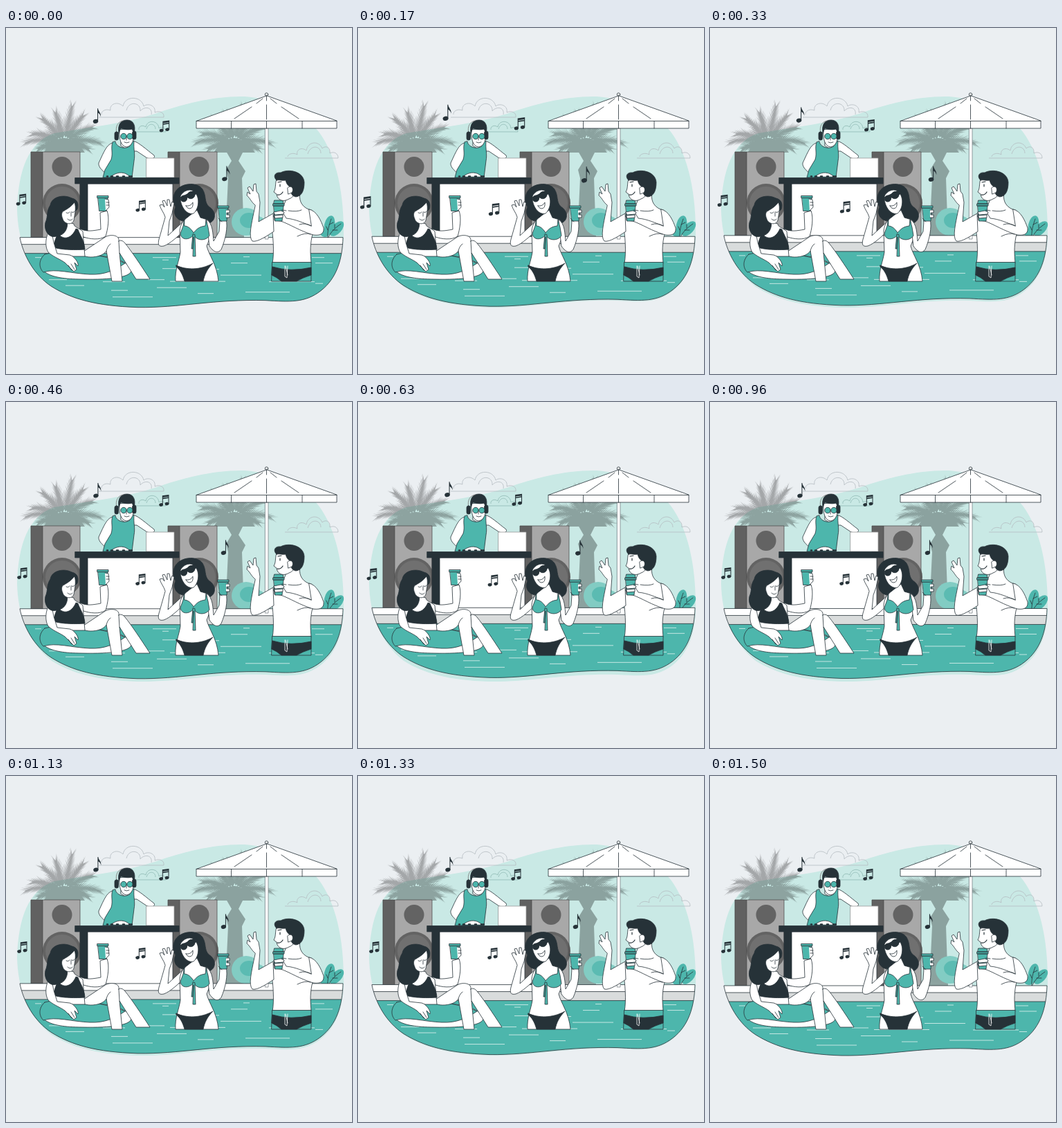
Animation of 500x500 px, one loop 1540 ms. Source, as an HTML page:

```html
<!DOCTYPE html>
<html lang="en">
<head>
<meta charset="utf-8">
<title>Pool party</title>
<style>
  html, body { margin: 0; width: 100%; height: 100%; overflow: hidden; background: #ebeff2; }
  svg { display: block; width: 100vw; height: 100vh; }
  .ink { fill: #fff; stroke: #263238; stroke-width: .8; stroke-linecap: round; stroke-linejoin: round; }
  .d { fill: #263238; }
  .t { fill: #4db6ac; }
  .n { fill: none; }
  .cloud { fill: none; stroke: #b4bcc0; stroke-width: .8; }
  .palm { fill: #000; opacity: .3; }
</style>
</head>
<body>
<svg viewBox="0 0 500 500">
  <defs>
    <g id="single" class="d">
      <ellipse cx="3.400" cy="18.500" rx="3.700" ry="2.900" transform="rotate(-15 3.400 18.500)"/>
      <path d="M5.900 0h1c0 4 4.500 6 4 12-.8-3-2-4.500-4-5.500V18.500h-1z"/>
    </g>
    <g id="double" class="d">
      <ellipse cx="2.600" cy="14.500" rx="2.900" ry="2.300" transform="rotate(-12 2.600 14.500)"/>
      <ellipse cx="11" cy="13.100" rx="2.900" ry="2.300" transform="rotate(-12 11 13.100)"/>
      <path d="M4.300 1.200 14 0V13.500h-1V5L5.300 6.200V14.500h-1zM5.300 3.800V4.600L13 3.500V2.700z"/>
    </g>
    <g id="speaker">
      <path fill="#616161" d="M0 0h18v126H0z"/>
      <path fill="#a8a8a8" d="M17 0h54v126H17z"/>
      <g fill="#636363"><circle cx="45" cy="21.500" r="14.500"/><circle cx="45" cy="74" r="28"/></g>
      <circle cx="45" cy="74" r="24" fill="#707070"/>
      <path d="M0 0h71v126M17 0v126M0 0v126" fill="none" stroke="#444" stroke-width=".7"/>
    </g>
    <g id="cup">
      <path class="t" d="M1 3h14l-2 19H3z"/><path class="t" d="M0 0h16v3H0z"/>
    </g>
    <clipPath id="poolClip"><use href="#poolShape"/></clipPath>
  </defs>

  <path fill="#c9e9e5" d="M16 262C18 205 32 165 70 152 130 142 175 137 215 124 255 110 300 98 345 99 385 102 425 116 452 150 478 185 489 240 488 303 486 335 478 362 455 380 432 398 410 396 375 394 300 392 250 405 190 404 130 402 95 392 66 374 30 345 17 305 16 262Z"/>

  <g class="cloud">
    <path d="M134 129H228C229 122 222 119 215 122 217 112 205 108 199 113 196 98 172 97 169 113 161 105 149 110 151 119 143 116 137 121 138 125M174 119C177 105 195 107 194 120 201 112 212 115 210 125"/>
    <path d="M403 188H480C480 181 474 178 468 181 469 171 461 170 457 174 452 162 436 164 434 177 426 171 419 177 421 183 414 179 407 183 407 186M436 182C440 168 455 170 455 181"/>
    <path stroke="#8fb9b3" d="M187 150H231C231 144 225 142 221 145 220 133 204 132 202 143 196 139 191 143 192 147M203 146C206 136 216 138 216 146"/>
  </g>
  <g class="palm"><path id="palmA"/></g>
  <g class="palm"><path id="palmB"/><path d="M318 178h25l-7 14 10 15-5 10 3 86h-27l4-86-3-12 8-13z"/></g>

  <ellipse cx="347" cy="280" rx="21" ry="20" fill="#82ccc3"/>
  <ellipse cx="363" cy="287" rx="14" ry="15" fill="#82ccc3"/>
  <ellipse class="t" opacity=".75" cx="351" cy="278" rx="13" ry="11"/>
  <g class="t">
    <ellipse cx="467.500" cy="285" rx="7.500" ry="14" transform="rotate(12 467.500 285)"/>
    <ellipse cx="478" cy="290" rx="13" ry="7" transform="rotate(-48 478 290)"/>
    <ellipse cx="461" cy="296" rx="7" ry="6"/>
    <path class="ink n" d="M465 304C464 294 467 284 470 276M465 304C470 293 477 288 484 283M465 292 463 287M467 284 473 281M475 289V284M472 292 479 292"/>
  </g>

  <use href="#speaker" x="36" y="179"/>
  <use href="#speaker" x="234" y="179"/>

  <!-- DJ and booth -->
  <g class="ink">
    <path d="M155 166C146 167 142 178 134 195 133 201 140 208 152 215H166L151 199 159 180zM184 163C193 166 202 175 214 184 216 188 212 190 204 188L189 178 183 178z"/>
    <path d="M167 160h15v10l-7 6-9-6z"/>
    <path class="t" d="M158 164C159 175 182 178 182 163L185 164C184 175 187 182 185 192L182 216H140L143 205 152 190C155 180 151 174 154 165z"/>
    <path d="M164 147C163 160 166 171 174 172 182 171 186 162 185 146z"/>
    <path class="d" d="M163 152C161 139 166 133 175 133 184 133 188 141 185 152L182 146C176 148 170 146 166 145z"/>
    <path class="n" stroke="#777" d="M160 153C157 141 163 135 169 134"/>
    <rect class="d" x="157" y="150" width="5.500" height="12" rx="2.500"/>
    <rect class="d" x="182.500" y="149" width="5.500" height="12" rx="2.500"/>
    <circle class="t" cx="170" cy="156.500" r="4.200"/><circle class="t" cx="179" cy="156.500" r="4.200"/>
    <path class="n" d="M174 158V162M171 165Q174 167 178 165"/>
    <path d="M151 215C160 208 168 208 174 211L180 215z"/>
    <path d="M203 188h40v28h-40z" stroke="#999"/>
    <path d="M117 225h124v80H117z"/>
    <path class="d" d="M100 216.500h150V225H118v79h-11V225h-7z"/>
    <path class="n" stroke-width="2.500" d="M146 214.500h1M152 214.500h2M160 214.500h2M169 214.500h2M178 214.500h4"/>
  </g>

  <!-- Pool -->
  <g id="pool">
    <g clip-path="url(#poolClip)">
      <path fill="#fff" d="M10 303h480v12H10z"/>
      <path fill="#d9dcdc" d="M10 313h480v14H10z"/>
      <path fill="#4db6ac" d="M10 326h480v84H10z"/>
      <path class="ink n" d="M10 313h480M10 326h480" stroke-width=".7"/>
      <path class="n" stroke="#c4e7e3" d="M42 332h9M212 332h34M226 335.500h9M343 331h9M325 340h24M442 332h18M447 340h25M226 348h20M300 349h8M310 357.500h59M205 364h24M237 366.500h80M380 367h66M447 369.500h11M62 364h26M86 372.500h27M152 379.500h24M154 389h58M218 375.500h43M277 384h23M346 382h64M140 367h32"/>
    </g>
    <path id="poolShape" fill="none" stroke="#263238" stroke-width=".8" d="M20 303H487C486 335 478 362 455 380 432 398 410 396 375 394 300 392 250 405 190 404 130 402 95 392 66 374 40 357 25 328 20 303Z"/>
  </g>

  <!-- Umbrella -->
  <g class="ink">
    <path stroke="#7b8589" d="M374.700 145h4.300v160h-4.300z"/>
    <circle cx="376.500" cy="96" r="2.200"/>
    <path d="M376.500 98 275 134.500V145H478V134.500z"/>
    <path class="n" d="M275 134.500H478M325.500 134.500V145M376.500 134.500V145M428 134.500V145M376.500 98V105M376.500 111V132M371 102 362 109M355 114 330 131M382 102 391 109M398 114 423 131"/>
  </g>

  <!-- Woman on the float -->
  <g class="ink">
    <path d="M52 334C45 350 58 363 110 363 153 364 181 360 181 350 179 337 150 328 105 327 72 321 57 324 52 334z"/>
    <path class="t" d="M56 327C47 335 47 346 54 353 72 347 95 355 121 356 143 357 157 350 172 340 145 327 80 320 56 327z"/>
    <path d="M163 308C165 299 150 297 142 303L109 325C108 333 138 334 145 322L153 366H168L164 325 188 363 208 363C195 343 181 322 172 311 169 307 165 306 163 308z"/>
    <path class="n" d="M145 322C146 318 148 314 151 312M164 325 163 308"/>
    <path d="M107 290C116 295 126 293 137 291L136 267 146 264C150 275 147 291 144 301 135 307 121 305 112 302z"/>
    <use href="#cup" x="132" y="242.500"/>
    <path d="M143 247 148 248 149 259 144 264M145 252h4M145 256h4"/>
    <path d="M66 292C72 287 83 290 85 279L98 283C98 288 106 289 111 294L113 319 114 330H73C60 321 56 302 66 292z"/>
    <path class="d" d="M77 289 78 300C86 307 96 302 101 290L104 291C107 300 113 306 114 320 101 321 81 321 69 317 69 308 74 301 77 289z"/>
    <path d="M65 291C57 297 55 317 62 325 71 332 78 334 85 339L98 352 102 349 99 339 104 344C106 340 98 329 92 328L74 326 69 310z"/>
    <path class="n" d="M90 343 95 350M94 341 99 349"/>
    <path class="d" d="M95 246C85 240 66 243 64 256 58 265 61 272 57 281 54 294 64 306 75 300 84 300 91 289 88 278L103 262C106 253 102 247 95 246z"/>
    <path d="M84 264C90 261 95 257 99 252 102 260 99 270 98 278 95 286 84 283 82 276 79 269 81 265 84 264z"/>
    <path class="n" d="M87 267Q90 269 92 266M95 266Q97 268 99 265M94 266V272M89 276Q93 280 96 276"/>
  </g>

  <!-- Woman with sunglasses -->
  <g class="ink">
    <path class="d" d="M244 238C250 224 276 221 284 233 290 243 286 251 293 258 303 264 305 277 294 282L262 279C247 281 240 268 245 259 241 250 241 244 244 238z"/>
    <path d="M230 273C228 266 224 263 222 256L226 255 229 259 226 250 229 249 233 257 233 248 236 248 238 258 240 251 243 253 240 268 236 279 234 300 258 278 262 288C250 300 237 312 228 315 219 317 219 311 222 302z"/>
    <path d="M263 273 276 263 281 274 291 277C300 288 295 303 290 315 293 328 305 342 307 366H245C244 349 250 337 252 324L251 293C252 284 256 278 263 273z"/>
    <path d="M290 277C299 282 299 298 300 308L308 294 309 279 318 276C321 288 317 306 311 320 306 327 299 323 294 315z"/>
    <use href="#cup" x="306" y="257"/>
    <path d="M318 263h5v4h-4v3h4v4h-5M307 275 312 280"/>
    <path d="M252 243C256 235 266 231 273 237 281 247 278 262 271 268 261 271 251 257 252 243z"/>
    <g class="d">
      <ellipse cx="257" cy="246.500" rx="4.800" ry="4.500" transform="rotate(-28 257 246.500)"/>
      <ellipse cx="267.500" cy="241.500" rx="5.800" ry="5" transform="rotate(-28 267.500 241.500)"/>
      <path d="M252 245 275 233 277 239 263 245z"/>
    </g>
    <path d="M260 257Q267 258 270 252 271 261 265 261 262 261 260 257z"/>
    <path class="t" d="M258 274 256 286 252 297C253 307 265 307 271 299 276 308 289 308 294 300L292 288 289 277 288 286C279 287 275 291 271 296 266 287 260 286 258 286z"/>
    <path class="t" d="M270 298 268 319 270 319 271 302 270 330H274L273 299z"/>
    <path class="d" d="M246 343C261 350 281 350 299 340 291 348 287 356 285 366H258C255 355 251 349 246 345z"/>
  </g>

  <!-- Man -->
  <g class="ink">
    <path d="M391 262C402 259 405 251 405 242L425 237C423 248 426 257 437 262 450 263 449 280 442 302 439 318 440 327 441 340H385C388 324 386 300 383 281z"/>
    <path d="M360 256C354 251 353 246 348 242L349 237 353 240 349 231 352 229 357 236 358 226 361 225 362 236 365 240 367 252 365 280 386 268 387 294C378 300 363 310 356 308 350 302 355 282 358 267z"/>
    <path d="M438 262C449 264 455 278 459 289 460 299 452 300 444 299 426 294 409 283 397 279L388 278 387 266 399 265 405 275C418 276 430 282 441 286z"/>
    <path class="t" d="M388 249h12l1 5H387zM386 254h16v3H386zM387 257h14l-2 22h-10z"/>
    <path d="M387 266 397 264 402 266 401 269 389 270zM388 271 400 270V274L389 275z"/>
    <path class="n" d="M398 263 405 264M408 264Q421 266 427 263M424 284Q433 281 441 286M421 301Q433 295 440 298"/>
    <path d="M392 216C388 224 391 230 387 237L391 240C392 249 401 252 409 247 416 245 421 235 420 224L408 210z"/>
    <path class="d" d="M391 220C385 214 389 208 397 209 408 203 430 207 431 223 431 234 428 243 419 244 414 243 411 240 412 233L410 229C406 227 405 223 404 220 400 221 394 219 391 220z"/>
    <path d="M407 231C412 226 417 232 413 238L408 240z"/>
    <path class="n" d="M396 226V229M393 223 398 222M392 241Q397 242 400 237" stroke-width="1.200"/>
    <path class="t" d="M385 338.500H441V366H384z"/>
    <path class="d" d="M385 345Q411 353 441 346V357Q428 361 420 366H398Q391 360 384 357z"/>
    <path class="n" stroke="#fff" d="M403 344V359L406 361 407 344M404 344 407 357"/>
  </g>

  <g id="notes">
    <use href="#single" x="126.500" y="117"/>
    <use href="#single" x="311" y="199.500"/>
    <use href="#double" x="221.500" y="134"/>
    <use href="#double" x="16.500" y="239"/>
    <use href="#double" x="187.500" y="248"/>
  </g>
</svg>
<script>
  const LOOP = 1540;
  const byId = id => document.getElementById(id);

  let seed = 7;
  const random = () => (seed = seed * 16807 % 2147483647) / 2147483647;

  // Each frond runs from the crown to its tip and carries pointed leaflets on both sides.
  function palm(cx, cy, tips) {
    let d = `M${cx - 30} ${cy + 12}Q${cx} ${cy - 30} ${cx + 30} ${cy + 12}z`;
    for (const [dx, dy] of tips) {
      const bend = -Math.abs(dx) * .4;
      for (let i = 4; i <= 20; i++) {
        const u = i / 20;
        const x = cx + dx * u, y = cy + dy * u + bend * u * (1 - u);
        const dir = Math.atan2(dy + bend * (1 - 2 * u), dx);
        for (const side of [-1, 1]) {
          const a = dir + side * (.8 - .45 * u);
          const len = (18 - 6 * u) * (.75 + random() * .4);
          const wx = side * Math.cos(dir) * 1.7, wy = side * Math.sin(dir) * 1.7;
          d += `M${x - wx} ${y - wy}L${x + wx} ${y + wy}L${x + Math.cos(a) * len} ${y + Math.sin(a) * len}z`;
        }
      }
    }
    return d;
  }
  const fronds = [[-54, -3], [-44, -15], [-30, -36], [-12, -44], [11, -53], [26, -40], [39, -24], [51, -2], [-36, 6], [34, 6]];
  byId('palmA').setAttribute('d', palm(84, 168, fronds));
  byId('palmB').setAttribute('d', palm(330, 168, fronds));

  // [time, extra scale] of the beating notes
  const beat = [[0, .01], [200, .09], [430, 0], [580, 0], [730, .09], [905, 0], [LOOP, 0]];
  function beatAt(t) {
    const i = beat.findIndex(key => key[0] > t);
    const [t0, a] = beat[i - 1], [t1, b] = beat[i];
    return a + (b - a) * (1 - Math.cos(Math.PI * (t - t0) / (t1 - t0))) / 2;
  }

  function draw() {
    const t = performance.now() % LOOP;
    const phase = (t + 40) % LOOP / LOOP;
    const rise = 6.5 * (1 - Math.abs(2 * phase - 1));
    byId('pool').setAttribute('transform', `translate(0 ${-rise})`);
    byId('notes').setAttribute('transform', `translate(169 191) scale(${1 + beatAt(t)}) translate(-169 -191)`);
    requestAnimationFrame(draw);
  }
  draw();
</script>
</body>
</html>
```
